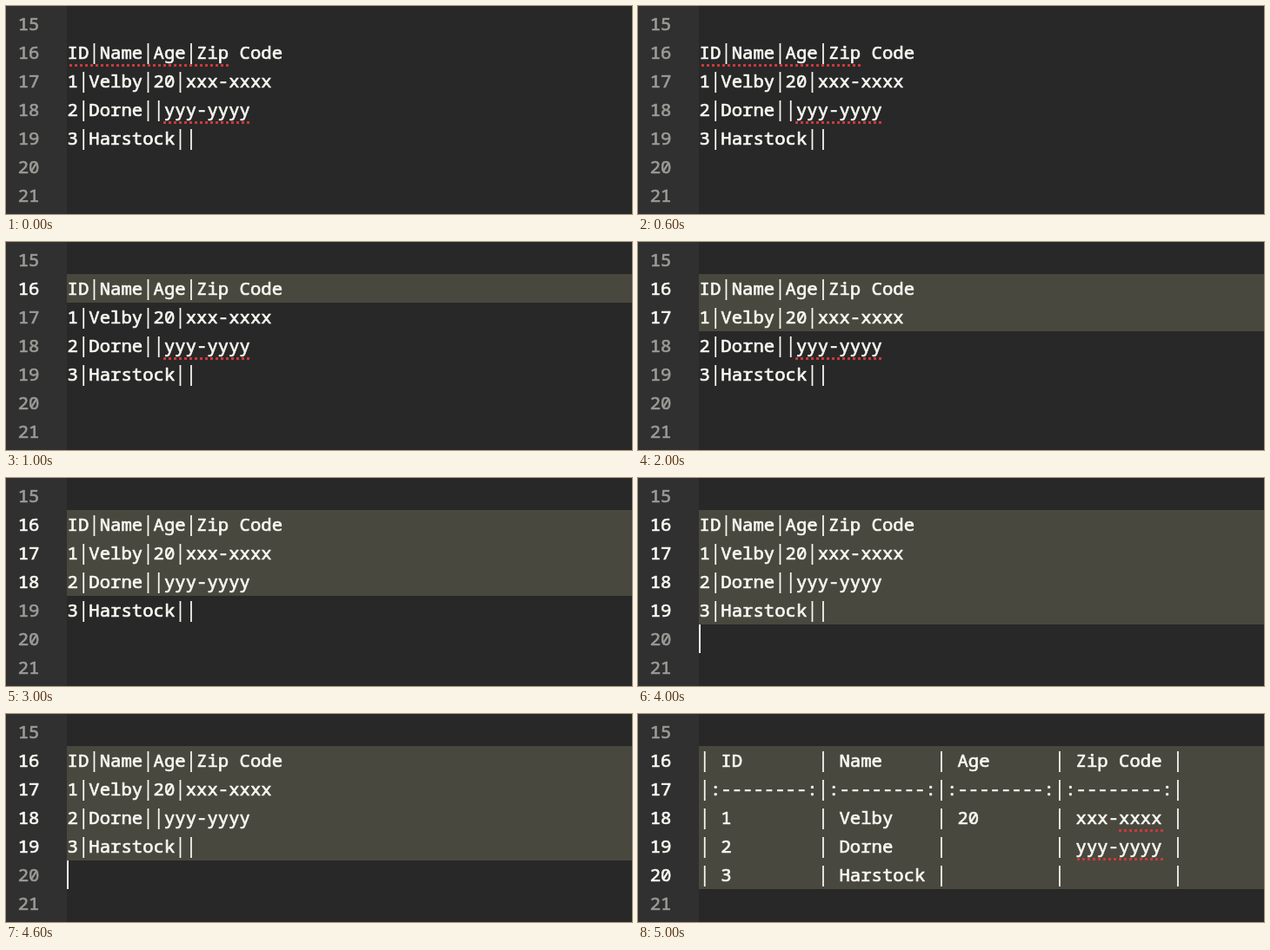
Animation of 720 by 240 pixels, one loop 6 s. Source, as an HTML page with a canvas:

```html
<!DOCTYPE html>
<html lang="en">
<head>
<meta charset="utf-8">
<title>Text to table</title>
<style>
  html, body { margin: 0; width: 100%; height: 100%; overflow: hidden; background: #282828; }
  canvas { display: block; width: 720px; height: 240px; }
</style>
</head>
<body>
<canvas id="stage" width="720" height="240"></canvas>
<script>
const ctx = document.getElementById('stage').getContext('2d');

const FAMILY = '"Noto Sans Mono", "DejaVu Sans Mono", monospace';
const TEXT_FONT = `20.6px ${FAMILY}`;
const BAR_FONT = `24px ${FAMILY}`;
const THICKEN = 0.7; // outline that lifts regular to a medium weight

const STEP = 1000, LOOP = 6000;
const CELL = 12.37, LINE = 33;
const LEFT = 70, TEXT_LEFT = 70.6, NUMBER_LEFT = 13.7;
const FIRST = 15, LAST = 21, START = 16;
const DOT = 3, DOT_PITCH = 6;

const COLOR = {
  page: '#282828', gutter: '#303030', selected: '#49483e',
  text: '#f8f8f2', number: '#9a9a96', spelling: '#cc383c'
};

const PLAIN = [
  'ID|Name|Age|Zip Code',
  '1|Velby|20|xxx-xxxx',
  '2|Dorne||yyy-yyyy',
  '3|Harstock||'
];

const tableRow = line => '|' + line.split('|').map(c => ` ${c.padEnd(9)}|`).join('');
const TABLE = PLAIN.map(tableRow);
TABLE.splice(1, 0, '|' + ':--------:|'.repeat(4));

// Spelling marks: line, first column, number of columns
const HEAD_MARK = [16, 0, 15];
const PLAIN_MARK = [18, 9, 8];
const TABLE_MARKS = [[18, 39, 4], [19, 35, 8]];
const MARKS = [[HEAD_MARK, PLAIN_MARK], [PLAIN_MARK], [PLAIN_MARK], [], [], TABLE_MARKS];

const lineTop = n => 4 + (n - FIRST) * LINE;

function drawText(str, x, line, color) {
  const baseline = lineTop(line) + 24;
  ctx.fillStyle = ctx.strokeStyle = color;
  ctx.lineWidth = THICKEN;
  ctx.lineJoin = 'round';
  ctx.textAlign = 'center';
  [...str].forEach((ch, i) => {
    const cx = x + (i + 0.5) * CELL;
    ctx.font = ch === '|' ? BAR_FONT : TEXT_FONT;
    ctx.fillText(ch, cx, baseline);
    if (ch !== '|') ctx.strokeText(ch, cx, baseline);
  });
}

// Dots sit on one grid shared by the whole stage
function drawMark([line, col, count]) {
  const x0 = LEFT + col * CELL;
  const x1 = x0 + count * CELL;
  const first = Math.ceil((x0 - DOT / 2) / DOT_PITCH) * DOT_PITCH + 1;
  ctx.fillStyle = COLOR.spelling;
  for (let x = first; x < x1; x += DOT_PITCH) {
    ctx.fillRect(x, lineTop(line) + 30, DOT, DOT);
  }
}

function draw(step) {
  const rows = step === 5 ? TABLE : PLAIN;
  const selected = step;

  ctx.fillStyle = COLOR.page;
  ctx.fillRect(0, 0, 720, 240);
  ctx.fillStyle = COLOR.gutter;
  ctx.fillRect(0, 0, LEFT, 240);
  ctx.fillStyle = COLOR.selected;
  ctx.fillRect(LEFT, lineTop(START), 720 - LEFT, selected * LINE);

  for (let n = FIRST; n <= LAST; n++) {
    const active = n >= START && n < START + selected;
    drawText(String(n), NUMBER_LEFT, n, active ? COLOR.text : COLOR.number);
  }

  MARKS[step].forEach(drawMark);
  rows.forEach((row, i) => drawText(row, TEXT_LEFT, START + i, COLOR.text));

  if (step === 4) {
    ctx.fillStyle = COLOR.text;
    ctx.fillRect(LEFT, lineTop(20), 2, LINE);
  }
}

const begin = performance.now();

function tick() {
  const time = (performance.now() - begin) % LOOP;
  draw(Math.floor(time / STEP));
  requestAnimationFrame(tick);
}
tick();
</script>
</body>
</html>
```
